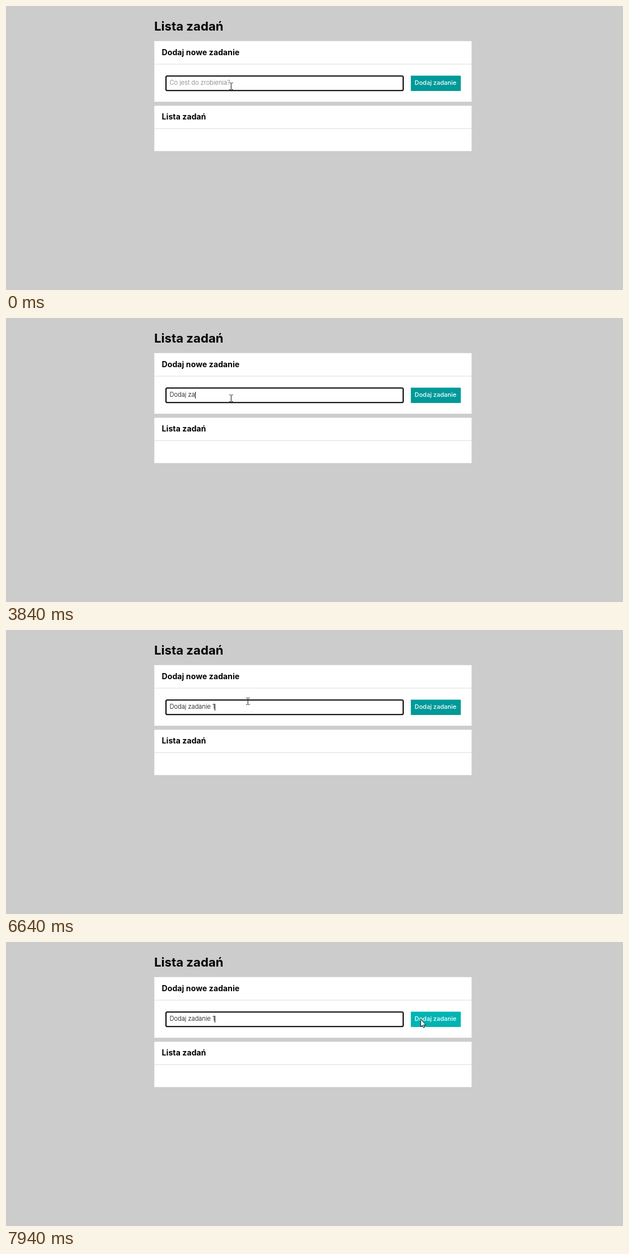
An HTML page for the animation above (8 s loop, 1103 by 508 pixels).

```html
<!DOCTYPE html>
<html lang="pl">
<head>
<meta charset="utf-8">
<title>Lista zadań</title>
<style>
  html, body { margin: 0; width: 100%; height: 100%; overflow: hidden; background: #ccc; }
  svg { display: block; width: 1103px; height: 508px; }
  text { font-family: Inter, "Open Sans", sans-serif; font-optical-sizing: none; white-space: pre; }
  .title { font-size: 22.2px; font-weight: 700; }
  .heading { font-size: 14px; font-weight: 700; letter-spacing: .1px; }
  .field { font-size: 11.1px; font-weight: 300; }
  .label { font-size: 11px; font-weight: 500; fill: #fff; }
  .panel { fill: #fff; stroke: #d6d6d6; stroke-width: .5; }
  .rule { fill: #ddd; }
</style>
</head>
<body>
<svg viewBox="0 0 1103 508">
  <rect width="1103" height="508" fill="#ccc"/>
  <text class="title" x="265" y="44">Lista zadań</text>

  <rect class="panel" x="265" y="62.7" width="567.5" height="108.6"/>
  <rect class="rule" x="265" y="103.5" width="567.5" height="1"/>
  <text class="heading" x="278.5" y="87.7">Dodaj nowe zadanie</text>

  <rect class="panel" x="265" y="178.2" width="567.5" height="81.6"/>
  <rect class="rule" x="265" y="219" width="567.5" height="1"/>
  <text class="heading" x="278.5" y="203">Lista zadań</text>

  <rect x="286" y="125.2" width="424" height="26" rx="2" fill="#fff" stroke="#000" stroke-width="2"/>
  <text class="field" id="placeholder" x="292.5" y="141.3" fill="#757575">Co jest do zrobienia?</text>
  <text class="field" id="typed" x="292.5" y="141.3"></text>
  <rect id="caret" y="132" width="1" height="12"/>

  <rect id="button" x="723.7" y="124.6" width="89.3" height="27.4"/>
  <text class="label" x="730.5" y="141.3">Dodaj zadanie</text>

  <path id="beam" d="M-3 -5.5H-1M1 -5.5H3M0 -5V6M-3 6.5H-1M1 6.5H3M-1 -5.5L0 -4.5L1 -5.5M-1 6.5L0 5.5L1 6.5"
        fill="none" stroke="#111"/>
  <path id="arrow" d="M.4 .4V13.6L3.4 10.9L5.4 15.5L7.4 14.6L5.4 10.2H9.8Z"
        fill="#fff" stroke="#000" stroke-width=".9" stroke-linejoin="round"/>
</svg>
<script>
const LOOP = 8000, BLINK = 530, TEXT_X = 292.5;
const MESSAGE = "Dodaj zadanie 1";
const KEY_TIMES = [2040, 2700, 2920, 2960, 3180, 3440, 3640, 3840,
                   4040, 4110, 4380, 4580, 4780, 5180, 5510];
const LAST_BLINK_START = 5580;
const ARROW_FROM = 7470, HOVER_FROM = 7540, HOVER_FADE = 140;

// Pointer hot spots: time, x, y
const POINTER = [
  [0, 402, 143], [6240, 404, 130], [6310, 405, 123], [6570, 411, 124],
  [6640, 432, 127], [6780, 529, 135], [6920, 625, 141], [6990, 646, 142],
  [7130, 665, 142], [7330, 672, 142], [7400, 695, 143], [7470, 715, 141],
  [7540, 732, 139], [7610, 739, 138], [7680, 741, 139], [7940, 741, 138]
];

const byId = id => document.getElementById(id);
const [placeholder, typed, caret, button, beam, arrow] =
  ["placeholder", "typed", "caret", "button", "beam", "arrow"].map(byId);
const show = (node, on) => node.setAttribute("visibility", on ? "visible" : "hidden");
const clamp01 = v => Math.min(1, Math.max(0, v));

// The pointer is sampled every 70 ms while it glides and rests elsewhere.
function pointerAt(t) {
  const gliding = t >= 6570 && t < 7330;
  const time = gliding ? 6570 + Math.floor((t - 6570) / 70) * 70 : t;
  const i = POINTER.findLastIndex(p => p[0] <= time);
  const [t0, x0, y0] = POINTER[i];
  if (!gliding) return [x0, y0];
  const [t1, x1, y1] = POINTER[i + 1];
  const k = (time - t0) / (t1 - t0);
  return [Math.round(x0 + (x1 - x0) * k), Math.round(y0 + (y1 - y0) * k)];
}

function caretVisible(t, count) {
  if (!count) return Math.floor((t - 380) / BLINK) % 2 === 0;
  const start = count === MESSAGE.length ? LAST_BLINK_START : KEY_TIMES[count - 1];
  return Math.floor(Math.max(0, t - start) / BLINK) % 2 === 0;
}

function render(t) {
  const count = KEY_TIMES.filter(k => k <= t).length;
  typed.textContent = MESSAGE.slice(0, count);
  show(placeholder, count === 0);
  const width = count ? typed.getComputedTextLength() : 0;
  caret.setAttribute("x", Math.round(TEXT_X + width));
  show(caret, caretVisible(t, count));

  const [x, y] = pointerAt(t);
  const isArrow = t >= ARROW_FROM;
  show(beam, !isArrow);
  show(arrow, isArrow);
  beam.setAttribute("transform", `translate(${x + .5} ${y})`);
  arrow.setAttribute("transform", `translate(${x} ${y})`);

  const tone = Math.round(153 + 27 * clamp01((t - HOVER_FROM) / HOVER_FADE));
  button.setAttribute("fill", `rgb(0,${tone},${tone})`);
}

const begin = performance.now();
function tick() {
  render((performance.now() - begin) % LOOP);
  requestAnimationFrame(tick);
}
tick();
</script>
</body>
</html>
```
